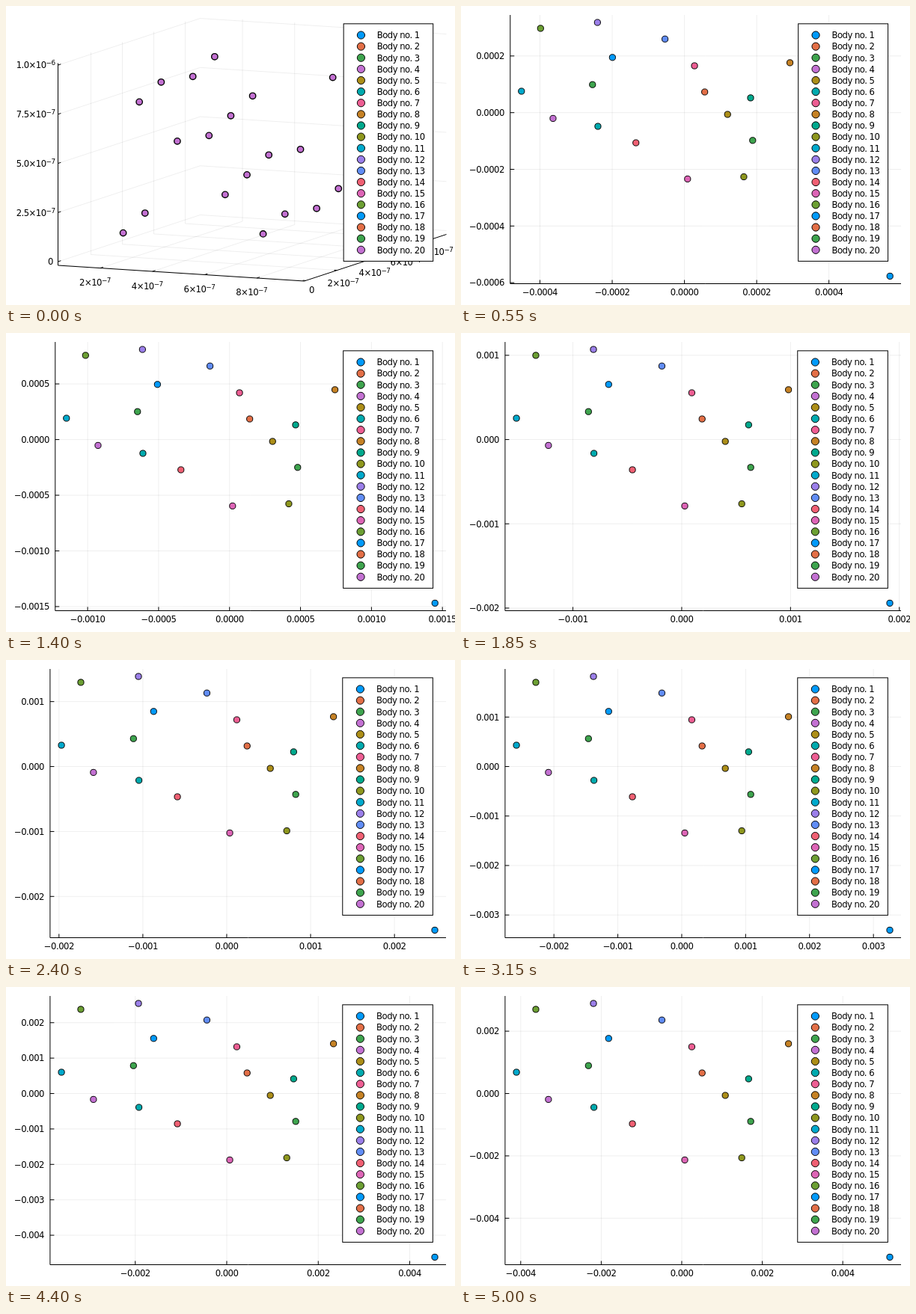
An HTML page with a canvas that plays this animation: 600x400 px, repeating every 5050 ms.

```html
<!DOCTYPE html>
<html lang="en">
<head>
<meta charset="utf-8">
<title>Drifting bodies</title>
<style>
html, body { margin: 0; width: 100%; height: 100%; overflow: hidden; background: #fff; }
canvas { display: block; }
</style>
</head>
<body>
<canvas id="stage" width="600" height="400"></canvas>
<script>
const ctx = document.getElementById('stage').getContext('2d');
const STEP_MS = 50, STEPS = 101, BODY_COUNT = 20;
const RIGHT = 588, TOP = 12, BOTTOM = 371.5, BASE_WIDTH = 529.5;
const FONT = 11.6, SUP_FONT = 8.8;
const PALETTE = ['#009afa', '#e36f47', '#3ea44e', '#c371d2', '#ac8e18', '#00aaae', '#ed5e93', '#c68225',
  '#00a98d', '#8e971e', '#00a9cc', '#9b7fe9', '#618df6', '#f06073', '#dd65b6', '#6c9f33'];
const color = index => PALETTE[index % PALETTE.length];

// One key point per body: the axes grow with the bodies, so these hold for the whole flight
const BODIES = [[197, 68.8], [322, 115], [387, 179.8], [116.5, 150.4], [353, 145], [177.3, 161], [308.2, 80],
  [437.5, 75.9], [384.2, 122.9], [375, 228.5], [73.7, 114], [176.7, 22], [268.2, 44.2], [228.8, 183],
  [298.8, 231.4], [99.6, 29.9], [573, 361.4], [510, 200], [170, 105.2], [480, 120]];

// Axis limits per step; the bodies start around OFFSET
const X_RATE = [-4.389e-5, 5.446e-5], Y_RATE = [-5.491e-5, 3.129e-5], OFFSET = 5e-7;

function line(points, style = '#000', width = 1) {
  ctx.beginPath();
  points.forEach(([x, y]) => ctx.lineTo(x, y));
  ctx.strokeStyle = style;
  ctx.lineWidth = width;
  ctx.stroke();
}
const gridLine = (...points) => line(points, 'rgba(0,0,0,0.065)');

function dot(x, y, radius, fill, width = 1) {
  ctx.beginPath();
  ctx.arc(x, y, radius, 0, 2 * Math.PI);
  ctx.fillStyle = fill;
  ctx.fill();
  ctx.strokeStyle = '#000';
  ctx.lineWidth = width;
  ctx.stroke();
}

function setFont(size) {
  ctx.font = `${size}px "DejaVu Sans", sans-serif`;
  ctx.letterSpacing = '-0.5px';
}
function textWidth(text, size = FONT) {
  setFont(size);
  return ctx.measureText(text).width;
}

// A label is "base" or "base^exponent"; align is 0 left, 0.5 centre, 1 right
function labelWidth(label) {
  const [base, sup = ''] = label.split('^');
  return textWidth(base) + textWidth(sup, SUP_FONT);
}
function drawLabel(label, x, y, align = 0) {
  const [base, sup = ''] = label.split('^');
  x -= labelWidth(label) * align;
  ctx.fillStyle = '#000';
  setFont(FONT);
  ctx.fillText(base, x, y);
  const baseWidth = textWidth(base);
  setFont(SUP_FONT);
  ctx.fillText(sup, x + baseWidth, y - 4);
}

const plain = (v, decimals) => (v < 0 ? '−' : '') + Math.abs(v).toFixed(decimals);
function scientificLabels(values) {
  const parts = values.map(v => v.toExponential(5).split('e').map(Number));
  const decimals = Math.max(...parts.map(([m]) => (String(m).split('.')[1] || '').length));
  return parts.map(([m, e]) => m === 0 ? '0' : `${plain(m, decimals)}×10^${plain(e, 0)}`);
}
const multiples = (step, first, count) => Array.from({ length: count }, (_, i) => (first + i) * step);

// Pick the step whose multiples score best on count, coverage and niceness
function chooseTicks(lo, hi) {
  const niceness = [[1, 1], [5, 0.9], [2, 0.7], [2.5, 0.5], [3, 0.2]];
  let best = { score: -Infinity };
  for (let power = -7; power <= -2; power++) {
    for (const [q, nice] of niceness) {
      const step = q * 10 ** power;
      const first = Math.ceil(lo / step), count = Math.floor(hi / step) - first + 1;
      if (count < 4 || count > 8) continue;
      const score = (1 - Math.abs(count - 5) / 5) / 4 + 0.5 * (hi - lo) / ((count - 1) * step) + nice / 4;
      if (score > best.score) best = { score, step, first, count, decimals: (q === 2.5) - power };
    }
  }
  const values = multiples(best.step, best.first, best.count);
  const scientific = (best.count - 1) * best.step < 9.99e-5;
  return { values, labels: scientific ? scientificLabels(values) : values.map(v => plain(v, best.decimals)) };
}

function drawLegend(plotWidth) {
  const extra = plotWidth - 522.7;
  const left = 450.6 - extra * 0.13, width = RIGHT - plotWidth / 30 - left;
  ctx.fillStyle = '#fff';
  ctx.fillRect(left, 23.8, width, 317.6);
  ctx.strokeStyle = '#000';
  ctx.lineWidth = 1;
  ctx.strokeRect(left, 23.8, width, 317.6);
  for (let i = 0; i < BODY_COUNT; i++) {
    const y = 39 + i * 15.12;
    dot(474 - extra * 0.1, y, 5.1, color(i));
    drawLabel(`Body no. ${i + 1}`, 495.5 - extra * 0.06, y + 4.3);
  }
}

// The cube in perspective: a runs across, b to the back, c up, each from 0 to 1
const CUBE_LEFT = 69.5;
const project = (a, b, c) => [CUBE_LEFT + 329 * a + 190 * b, 347 + 21 * a - 62.5 * b - 270.5 * c];

function drawStart() {
  const fineLabels = scientificLabels(multiples(2.5e-7, 0, 5));
  const coarseLabels = scientificLabels(multiples(2e-7, 0, 5));
  for (let i = 0; i < 5; i++) {
    const c = 0.0185 + i * 0.243, z = project(0, 0, c);
    gridLine(z, project(0, 1, c), project(1, 1, c));
    line([z, project(0, 0.02, c)]);
    drawLabel(fineLabels[i], i ? 65.5 : 63, z[1] + 4.3, 1);

    const b = 0.0105 + i * 0.221, edge = project(1, b, 0);
    gridLine(project(0, b, 1), project(0, b, 0), edge);
    line([edge, project(0.988, b, 0)]);
    drawLabel(coarseLabels[i], edge[0] + 8, edge[1] + (i ? 21 : 16.5), 0.5);

    if (i === 0) continue;
    const a = i * 0.2119 - 0.0402, x = project(a, 0, 0);
    gridLine(x, project(a, 1, 0), project(a, 1, 1));
    line([x, project(a, 0.02, 0)]);
    drawLabel(coarseLabels[i], x[0] - 7, x[1] + 23.5, 0.5);
  }
  line([project(0, 0, 1), project(0, 0, 0), project(1, 0, 0), project(1, 1, 0)]);

  // Evenly scattered starting places
  const scatter = (i, ratio) => 0.03 + 0.94 * (i * ratio % 1);
  for (let i = 1; i <= BODY_COUNT; i++) {
    const [x, y] = project(scatter(i, 0.8192), scatter(i, 0.671), scatter(i, 0.5497));
    dot(x, y, 4.2, color(BODY_COUNT - 1), 1.4);
  }
  drawLegend(RIGHT - CUBE_LEFT);
}

function drawPlane(step) {
  const limits = rate => rate.map(r => r * step + OFFSET);
  const [xLo, xHi] = limits(X_RATE), [yLo, yHi] = limits(Y_RATE);
  const xTicks = chooseTicks(xLo, xHi), yTicks = chooseTicks(yLo, yHi);
  const left = 19 + Math.max(...yTicks.labels.map(labelWidth));
  const width = RIGHT - left;
  const toX = v => left + (v - xLo) / (xHi - xLo) * width;
  const toY = v => BOTTOM - (v - yLo) / (yHi - yLo) * (BOTTOM - TOP);

  xTicks.values.forEach((v, i) => {
    const x = toX(v), label = xTicks.labels[i];
    gridLine([x, TOP], [x, BOTTOM]);
    line([[x, BOTTOM], [x, BOTTOM - 5]]);
    drawLabel(label, x, label.includes('^') ? 390 : 387, 0.5);
  });
  yTicks.values.forEach((v, i) => {
    const y = toY(v);
    gridLine([left, y], [RIGHT, y]);
    line([[left, y], [left + 5.5, y]]);
    drawLabel(yTicks.labels[i], left - 8, y + 4.3, 1);
  });
  line([[left, TOP], [left, BOTTOM], [RIGHT, BOTTOM]]);
  BODIES.forEach(([x, y], i) => dot(RIGHT - (RIGHT - x) * width / BASE_WIDTH, y, 4.1, color(i)));
  drawLegend(width);
}

function render(now) {
  const step = Math.floor(now / STEP_MS) % STEPS;
  ctx.fillStyle = '#fff';
  ctx.fillRect(0, 0, 600, 400);
  if (step === 0) drawStart();
  else drawPlane(step);
}

let startTime;
function tick(now) {
  startTime ??= now;
  render(now - startTime);
  requestAnimationFrame(tick);
}
render(0);
requestAnimationFrame(tick);
</script>
</body>
</html>
```
